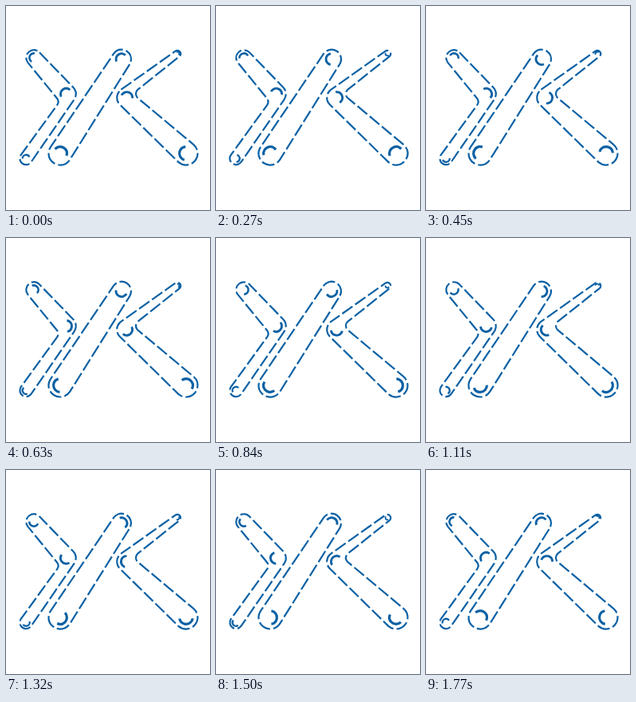
Write an HTML page with a canvas that moves like this. It is 256 px wide and 256 px high and loops after 1.8 s.

```html
<!DOCTYPE html>
<html lang="en">
<head>
<meta charset="utf-8">
<title>Belts</title>
<style>
html, body { margin: 0; width: 100%; height: 100%; overflow: hidden; background: #fff; }
canvas { display: block; width: 256px; height: 256px; }
</style>
</head>
<body>
<canvas id="stage"></canvas>
<script>
const SIZE = 256, LOOP = 1800, STEP = 30, TAU = Math.PI * 2;
const DASH = 20, GAP = 4, SHIFT = 4;
const canvas = document.getElementById('stage');
const ctx = canvas.getContext('2d');
const ratio = window.devicePixelRatio || 1;
canvas.width = canvas.height = SIZE * ratio;

// Wheel: centre, radius, mark angle in degrees, turns per loop.
// Wheels without turns bend the belt inwards and carry no mark.
const wheel = (x, y, r, mark = 0, turns = 0) => ({ x, y, r, mark, turns, side: turns ? 1 : -1 });

const belts = [
  { dir: 1, wheels: [
    wheel(35, 65, 9.7, 200, 1),
    wheel(75.5, 110.5, 12.2, -128, 1),
    wheel(25.2, 191.3, 7.8, -103, 2),
    wheel(58.5, 120.2, 7)] },
  { dir: -1, wheels: [
    wheel(145, 66.7, 12, -125, 1),
    wheel(68, 185, 14.5, -60, 1)] },
  { dir: 1, wheels: [
    wheel(151.5, 115, 12.3, -75, 1),
    wheel(215, 60, 4.2, -36, 3),
    wheel(170, 110.2, 7),
    wheel(226, 185, 14.5, 185, 1)] }
];

// Finds where the belt enters and leaves each wheel, and its full length.
function fit(belt) {
  const ws = belt.wheels;
  belt.length = 0;
  ws.forEach((a, i) => {
    const b = ws[(i + 1) % ws.length];
    const dx = b.x - a.x, dy = b.y - a.y, dist = Math.hypot(dx, dy);
    const k = b.side * b.r - a.side * a.r;
    const normal = Math.atan2(dy, dx) + Math.acos(k / dist);
    a.leave = normal + (a.side > 0 ? Math.PI : 0);
    b.enter = normal + (b.side > 0 ? Math.PI : 0);
    belt.length += Math.sqrt(dist * dist - k * k);
  });
  for (const w of ws) {
    const sweep = (w.side * (w.leave - w.enter) % TAU + TAU) % TAU;
    belt.length += sweep * w.r;
  }
  belt.period = belt.length / Math.round(belt.length / DASH);
}

function drawBelt({ wheels, dir, period }, p) {
  const first = wheels[0];
  ctx.lineWidth = 2.2;
  ctx.setLineDash([period - GAP, GAP]);
  ctx.lineDashOffset = -dir * SHIFT * period * p;
  ctx.beginPath();
  ctx.moveTo(first.x + first.r * Math.cos(first.leave), first.y + first.r * Math.sin(first.leave));
  for (const w of [...wheels.slice(1), first]) {
    ctx.arc(w.x, w.y, w.r, w.enter, w.leave, w.side < 0);
  }
  ctx.stroke();

  ctx.setLineDash([]);
  for (const w of wheels) {
    if (!w.turns) continue;
    const mid = w.mark * Math.PI / 180 + dir * w.turns * p * TAU;
    ctx.lineWidth = 1.3 + w.r * 0.13;
    ctx.beginPath();
    ctx.arc(w.x, w.y, w.r * 0.58, mid - 1.4, mid + 1.4);
    ctx.stroke();
  }
}

function frame() {
  const t = performance.now() % LOOP;
  const p = Math.floor(t / STEP) * STEP / LOOP;
  ctx.setTransform(ratio, 0, 0, ratio, 0, 0);
  ctx.fillStyle = '#fff';
  ctx.fillRect(0, 0, SIZE, SIZE);
  ctx.strokeStyle = '#0b61a4';
  for (const belt of belts) drawBelt(belt, p);
  requestAnimationFrame(frame);
}

belts.forEach(fit);
frame();
</script>
</body>
</html>
```
